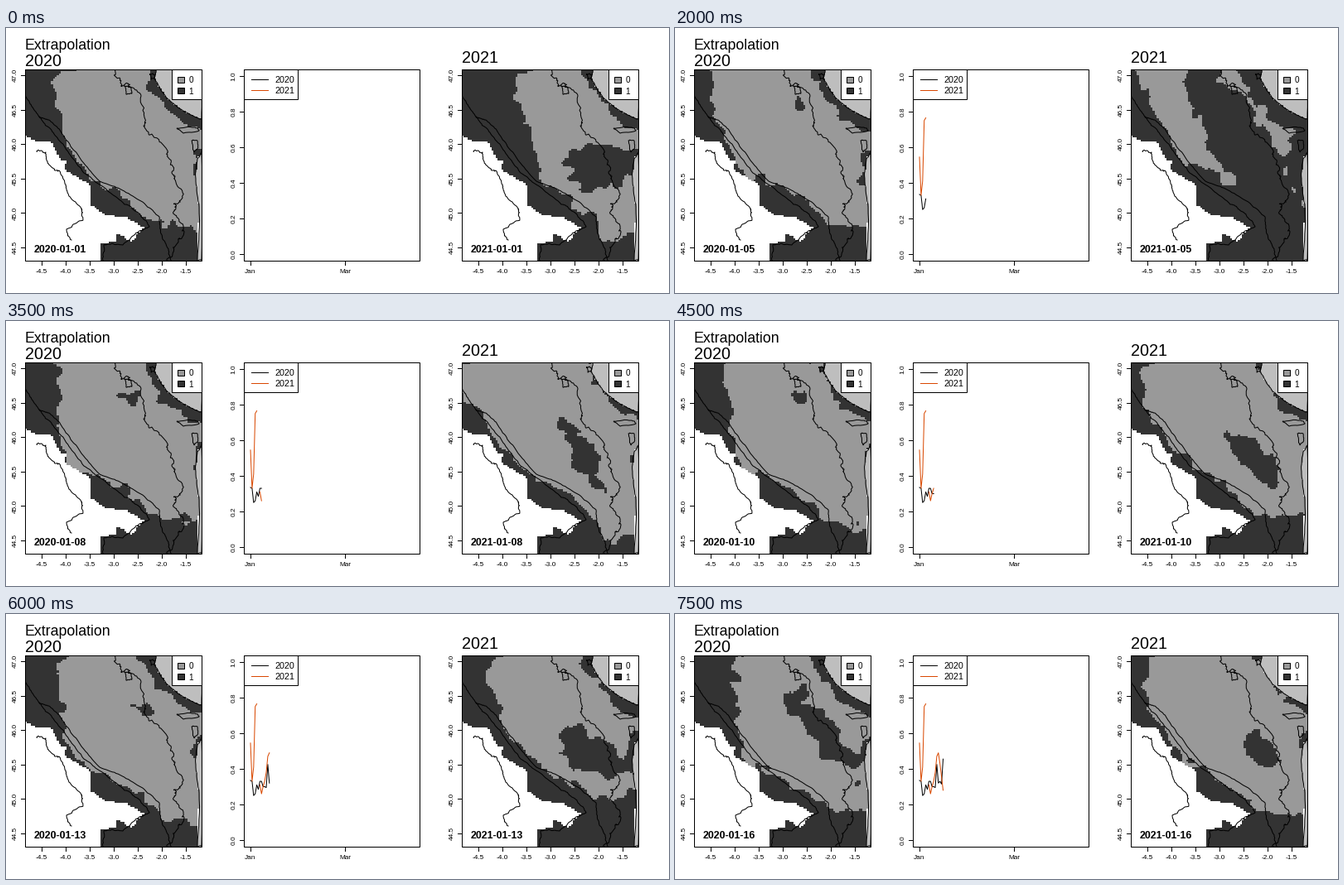
Write a matplotlib script that moves like this. It is 800 px wide and 320 px high and loops after 8 s.

```python
import numpy as np
import matplotlib.pyplot as plt
from matplotlib.animation import FuncAnimation
from matplotlib.colors import ListedColormap
from matplotlib.patches import Polygon, Rectangle
from matplotlib.path import Path

plt.rcParams["font.family"] = "Liberation Sans"
PX = 0.9                      # points per pixel at 80 dpi
DAYS = 16
COLS, ROWS = 89, 101
LEFT, TOP, RIGHT, BOTTOM = 23, 50, 236, 281
GREY, DARK, LAND, ORANGE = "#999999", "#333333", "#bebebe", "#d94801"

# Dark share of the sea, day by day
SHARE = {
    2020: [.335, .33, .25, .26, .31, .285, .33, .33,
           .30, .30, .295, .425, .32, .33, .315, .455],
    2021: [.545, .33, .41, .75, .765, np.nan, .31, .26,
           .30, .33, .38, .47, .49, .43, .355, .28],
}
# Key days: western front (width, slope) and the latitude of the southern front
FRONTS = {
    2020: [(1, 28, .3, 242), (3, 5, 0, 243), (8, 45, -.1, 242),
           (12, 32, .3, 246), (15, 42, -.1, 240), (16, 48, .05, 236)],
    2021: [(1, 50, .35, 262), (3, 8, -.3, 262), (8, -10, .2, 262),
           (12, 25, .3, 212), (15, 15, .2, 255), (16, 15, .15, 240)],
}
# Key days: centre, half axes and tilt of the drifting eddy
EDDIES = {
    2020: [(1, 150, 95, 1, 1, 50), (8, 150, 95, 4, 3, 50), (12, 150, 99, 13, 8, 0),
           (15, 200, 155, 45, 9, 50), (16, 180, 145, 60, 17, 50)],
    2021: [(1, 185, 167, 32, 26, 0), (3, 155, 137, 76, 17, 57), (8, 170, 165, 50, 15, 62),
           (12, 178, 170, 30, 17, 30), (16, 180, 167, 26, 17, 45)],
}


def poly(*xy):
    return np.array(xy, float).reshape(-1, 2)


def at_day(keys, day):
    days, *columns = zip(*keys)
    return [np.interp(day, days, c) for c in columns]


def noise(seed, times):
    a = np.random.default_rng(seed).standard_normal((ROWS, COLS))
    for _ in range(times):
        p = np.pad(a, 1, mode="edge")
        a = sum(p[i:i + ROWS, j:j + COLS] for i in range(3) for j in range(3)) / 9
    return a / a.std()


def rough(pts, seed, amp, steps=4):
    """Fractal midpoint displacement along a polyline."""
    rng = np.random.default_rng(seed)
    for _ in range(steps):
        mid = (pts[1:] + pts[:-1]) / 2 + rng.uniform(-amp, amp, (len(pts) - 1, 2))
        out = np.empty((len(pts) + len(mid), 2))
        out[::2], out[1::2] = pts, mid
        pts, amp = out, amp * 0.6
    return pts


# Geography, in the pixels of the first map
NO_DATA = poly(20, 129, 40, 138, 54, 136, 66, 160, 73, 160, 71, 171, 103, 190, 103, 214,
               120, 226, 146, 229, 166, 241, 151, 258, 134, 248, 134, 257, 113, 262,
               113, 285, 20, 285)
MAINLAND = poly(181, 50, 179, 61, 194, 85, 215, 101, 236, 110, 236, 50)
ISLES = [poly(206, 121, 228, 120, 233, 124, 214, 127),
         poly(224, 136, 231, 136, 231, 146, 227, 150),
         poly(173, 56, 177, 55, 179, 60, 175, 62)]
EAST = poly(236, 150, 231, 158, 229, 185, 233, 216, 231, 281, 236, 281)
CONTOURS = [
    (poly(24, 83, 40, 107, 58, 128, 83, 160, 108, 186, 143, 213, 158, 222, 173, 240,
          159, 247, 141, 262, 118, 262, 117, 281), 2),
    (poly(40, 107, 54, 113, 78, 143, 113, 185, 153, 203, 185, 228, 189, 255, 199, 281), 2),
    (poly(37, 149, 48, 150, 54, 167, 64, 172, 74, 197, 91, 218, 93, 232, 73, 243,
          79, 256), 2.5),
    (poly(130, 50, 141, 70, 163, 82, 166, 118, 193, 145, 200, 175, 213, 205, 203, 220,
          214, 240, 203, 265, 195, 281), 6),
    (poly(143, 70, 150, 71, 152, 79, 145, 80, 143, 70), 1),
]

gx, gy = np.meshgrid(LEFT + (np.arange(COLS) + .5) * (RIGHT - LEFT) / COLS,
                     TOP + (np.arange(ROWS) + .5) * (BOTTOM - TOP) / ROWS)
cells = np.column_stack([gx.ravel(), gy.ravel()])
SEA = ~np.any([Path(s).contains_points(cells) for s in (NO_DATA, MAINLAND, EAST)],
              axis=0).reshape(ROWS, COLS)


def day_map(year, day):
    """Each term is a rough signed distance in pixels, positive inside the dark area."""
    share = SHARE[year][day - 1]
    if np.isnan(share):
        return np.full((ROWS, COLS), np.nan)
    width, slope, south = at_day(FRONTS[year], day)
    cx, cy, a, b, tilt = at_day(EDDIES[year], day)

    shelf = .75 * (gy - np.interp(gx, [24, 65, 115, 150, 185, 193],
                                  [86, 137, 189, 209, min(south, 238), south]))
    shelf -= 20 * np.clip(1 - slope / .3, 0, 1) * np.exp(-((gx - 84) / 18) ** 2)
    west = width - (gx - LEFT) + slope * (gy - TOP + 120 * np.exp((TOP - gy) / 5))
    band = 0 if year == 2020 else 9
    northeast = .7 * (gx - band - np.interp(gy, [50, 82, 110, 124, 130],
                                            [164, 181, 204, 234, 280]))
    east = 9 - np.hypot(gx - RIGHT, (gy - 165) / 1.6)
    c, s = np.cos(np.radians(tilt)), np.sin(np.radians(tilt))
    u, v = c * (gx - cx) + s * (gy - cy), c * (gy - cy) - s * (gx - cx)
    eddy = b * (1 - np.hypot(u / a, v / b))

    score = np.max([shelf, west, northeast, east, eddy], axis=0)
    score += 3 * noise(year * 100 + day, 6) + noise(year + day, 2)
    return np.where(SEA, score > np.quantile(score[SEA], 1 - share), np.nan)


MAPS = {y: [day_map(y, d + 1) for d in range(DAYS)] for y in SHARE}

fig = plt.figure(figsize=(10, 4), dpi=80, facecolor="white")
ax = fig.add_axes([0, 0, 1, 1])
ax.axis("off")


def line(x, y, color="black", **kw):
    return ax.plot(x, y, color=color, lw=PX, **kw)[0]


def text(x, y, s, size, ha="center", va="center", **kw):
    return ax.text(x, y, s, fontsize=size * PX, ha=ha, va=va, **kw)


def box(x0, y0, x1, y1, face="none", z=5):
    return ax.add_patch(Rectangle((x0, y0), x1 - x0, y1 - y0, fc=face, ec="black",
                                  lw=PX, zorder=z))


def x_tick(x, s):
    line([x, x], [BOTTOM, BOTTOM + 5])
    text(x, 295, s, 8.2)


def y_tick(x, y, s):
    line([x - 5, x], [y, y])
    text(x - 12, y, s, 8.2, rotation=90)


def draw_map(off, year):
    frame = box(LEFT + off, TOP, RIGHT + off, BOTTOM)
    shift = np.array([off, 0])
    for i, shape in enumerate([MAINLAND, EAST] + ISLES):
        edge = rough(np.vstack([shape, shape[:1]]), i, 1.2, 3) + shift
        for face, edge_color, z in ((LAND, "none", 1), ("none", "black", 3)):
            p = Polygon(edge, fc=face, ec=edge_color, lw=PX, zorder=z)
            ax.add_patch(p).set_clip_path(frame)
    img = ax.imshow(MAPS[year][0], cmap=ListedColormap([GREY, DARK]), vmin=0, vmax=1,
                    extent=(LEFT + off, RIGHT + off, BOTTOM, TOP), aspect="auto",
                    interpolation="nearest", zorder=2)
    for i, (pts, amp) in enumerate(CONTOURS):
        x, y = (rough(pts, 20 + i, amp) + shift).T
        line(x, y, zorder=3).set_clip_path(frame)
    box(200 + off, TOP, RIGHT + off, 86, "white")
    for y, face, s in ((62, GREY, "0"), (75.5, DARK, "1")):
        box(207 + off, y - 3.5, 215 + off, y + 3.5, face, 6)
        text(223.5 + off, y, s, 10, va="center_baseline", zorder=6)
    for i in range(7):
        x_tick(43 + 29 * i + off, f"{-4.5 + i / 2:.1f}")
    for i in range(6):
        y_tick(LEFT + off, 57 + 41.6 * i, f"{47 - i / 2:.1f}")
    label = text(34 + off, 271, "", 12.4, "left", "baseline", weight="bold", zorder=6)
    return img, label


panels = {2020: draw_map(0, 2020), 2021: draw_map(527, 2021)}
text(23, 26.5, "Extrapolation", 17.8, "left", "baseline")
text(23, 45.5, "2020", 19.8, "left", "baseline")
text(550, 42.5, "2021", 19.8, "left", "baseline")

box(287, TOP, 499, BOTTOM)
box(287, TOP, 352, 86, "white")
x_tick(295, "Jan")
x_tick(409, "Mar")
for i in range(6):
    y_tick(287, 273 - 43 * i, f"{i / 5:.1f}")

curves = {}
for year, color, y in ((2020, "black", 62), (2021, ORANGE, 75)):
    line([296, 316], [y, y], color, zorder=6)
    text(324, y, str(year), 10.7, "left", "center_baseline", zorder=6)
    curves[year] = line([], [], color, zorder=4)

ax.set_xlim(0, 800)
ax.set_ylim(320, 0)
day_x = 295 + 1.9 * np.arange(DAYS)


def update(i):
    for year, (img, label) in panels.items():
        img.set_data(MAPS[year][i])
        label.set_text(f"{year}-01-{i + 1:02d}")
        n = i + 1 if i else 0
        curves[year].set_data(day_x[:n], 273 - 215 * np.array(SHARE[year][:n]))
    return []


anim = FuncAnimation(fig, update, frames=DAYS, interval=500, repeat=True, repeat_delay=0)
plt.show()
```
